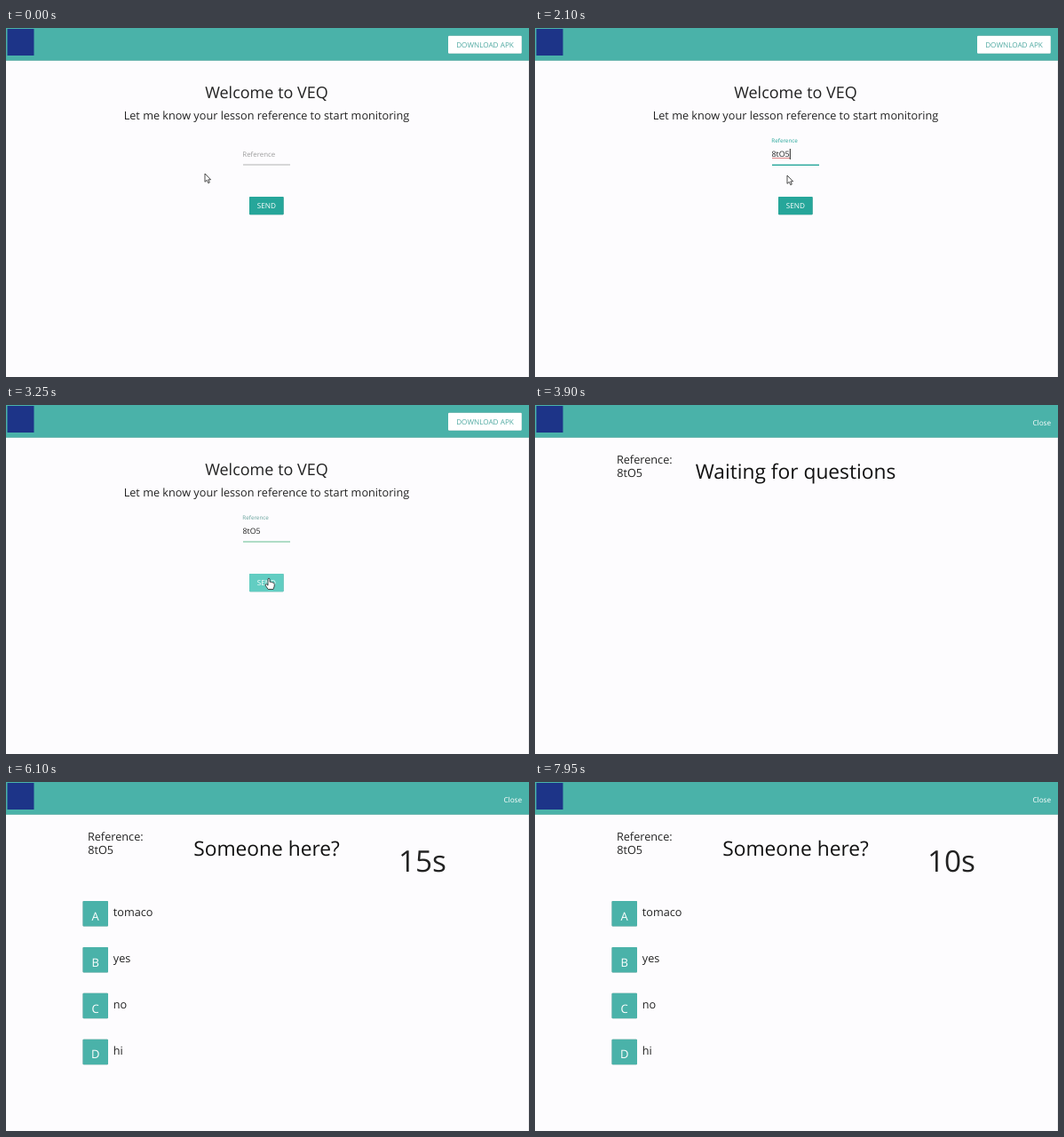
Recreate the animation shown at these times as an HTML page. Size 589 by 393 pixels, loop 8 s.

```html
<!DOCTYPE html>
<html lang="en">
<head>
<meta charset="utf-8">
<style>
  html, body { margin: 0; width: 100%; height: 100%; overflow: hidden; background: #fdfcfe; }
  svg { display: block; width: 589px; height: 393px; font-family: "Open Sans", "Noto Sans", sans-serif; fill: #222; text-rendering: geometricPrecision; }
  .teal { fill: #4ab2a9; }
  .white { fill: #fff; }
  .mid { text-anchor: middle; }
  .raised { filter: drop-shadow(0 .8px .5px rgba(0, 0, 0, .32)); }
  .caps { font-size: 8.2px; font-weight: 500; }
  .body { font-size: 12.7px; }
  .title { font-size: 22.75px; fill: #111; }
  .pointer { stroke: #222; stroke-width: .8; stroke-linejoin: round; fill: #fff; }
</style>
</head>
<body>
<svg viewBox="0 0 589 393">
  <rect x="588" y="37" width="1" height="356" fill="#ecebed"/>
  <rect class="teal raised" width="589" height="36.7"/>
  <rect x="1.5" y="1" width="30" height="30" fill="#1d3488"/>

  <g id="login">
    <rect class="white raised" x="498" y="8.8" width="82.8" height="20" rx="1"/>
    <text class="caps mid" x="539.5" y="21.5" fill="#4fa9a1">DOWNLOAD APK</text>
    <text class="mid" x="293.5" y="78.5" font-size="18">Welcome to VEQ</text>
    <text class="body mid" x="293.5" y="103">Let me know your lesson reference to start monitoring</text>
    <text id="label" font-size="7.9">Reference</text>
    <text id="typed" x="266.5" y="145.4" font-size="8.9"></text>
    <path id="squiggle" fill="none" stroke="#c33" stroke-width=".6"/>
    <rect id="caret" y="136" width="1" height="12"/>
    <rect id="underline" x="267" width="53"/>
    <rect id="send" class="raised" x="274" y="190" width="38.7" height="20.3" rx="1"/>
    <text class="caps white mid" x="293.3" y="203.2">SEND</text>
    <rect id="ripple" class="white" x="274" y="190" width="38.7" height="20.3" rx="1"/>
    <g id="cursor">
      <path id="arrow" class="pointer" d="M0 0V9.3L2.2 7.3L3.8 10.7L5.3 10L3.8 6.8H6.6Z"/>
      <path id="beam" d="M-2-4.5H-.5L0-4L.5-4.5H2M0-4V4M-2 4.5H-.5L0 4L.5 4.5H2" fill="none" stroke="#222" stroke-width=".9"/>
      <path id="hand" class="pointer" d="M-1 .8Q0-.8 1 .8V4.3Q2.3 3.6 3 4.7Q4.2 4.2 4.7 5.2Q6.2 5 6.2 6.5V9L5 12.5H-.8L-3.8 8.2Q-4.2 6.4-2.6 6.8L-1 8.2Z"/>
    </g>
  </g>

  <g id="lesson">
    <text class="white" x="560.4" y="22.8" font-size="8.2">Close</text>
    <text class="body" x="91.9" y="66">Reference:</text>
    <text class="body" x="92.2" y="81">8tO5</text>
    <text id="waiting" class="title mid" x="293.5" y="83">Waiting for questions</text>
    <g id="question">
      <text class="title mid" x="293.5" y="83">Someone here?</text>
      <text id="counter" x="442" y="100.8" font-size="33.3"></text>
      <g id="answers"></g>
    </g>
  </g>
</svg>
<script>
const LOOP = 8000, FOCUS = 1080, TYPE = 1400, KEY = 130, CLICK = 3170;
const LESSON = 3550, QUESTION = 5925, TICK = 375;
const CODE = "8tO5";
// Pointer stops: time, x, y
const PATH = [[0, 224, 164], [350, 224, 164], [900, 278, 149], [1500, 278, 149],
              [1950, 284, 166], [2450, 284, 166], [2900, 296, 195], [LOOP, 296, 195]];

const el = id => document.getElementById(id);
const show = (id, on) => el(id).style.display = on ? "" : "none";
const set = (id, attrs) => { for (const k in attrs) el(id).setAttribute(k, attrs[k]); };
const ramp = (t, from, to) => Math.min(1, Math.max(0, (t - from) / (to - from)));
const smooth = p => p * p * (3 - 2 * p);
const mix = (a, b, p) => a + (b - a) * p;
const blend = (a, b, p) => `rgb(${a.map((v, i) => Math.round(mix(v, b[i], p)))})`;

const GREY = [158, 158, 158], TEAL = [38, 166, 154], LIGHT = [43, 187, 173], GREEN = [76, 175, 80];

el("answers").innerHTML = ["tomaco", "yes", "no", "hi"].map((word, i) => `
  <g transform="translate(0 ${i * 51.9})">
    <rect class="teal raised" x="86.5" y="134" width="28.5" height="28.5" rx="1"/>
    <text class="white mid" x="100.7" y="155.8" font-size="13">${"ABCD"[i]}</text>
    <text class="body" x="120.8" y="151.2">${word}</text>
  </g>`).join("");

function pointerAt(t) {
  const i = PATH.findIndex(stop => stop[0] > t);
  const [t0, x0, y0] = PATH[i - 1], [t1, x1, y1] = PATH[i];
  const p = smooth(ramp(t, t0, t1));
  return [mix(x0, x1, p), mix(y0, y1, p)];
}

function drawLogin(t) {
  const focused = t >= FOCUS && t < CLICK;
  const lift = ramp(t, FOCUS, FOCUS + 85);
  const blur = ramp(t, CLICK, CLICK + 150);
  const gain = ramp(t, FOCUS, FOCUS + 60);
  set("label", {
    transform: `translate(266.3 ${mix(145.3, 129.2, lift)}) scale(${mix(1, .8, lift)})`,
    fill: t < CLICK ? blend(GREY, TEAL, gain) : blend(TEAL, GREY, blur)
  });

  const count = Math.min(CODE.length, Math.max(0, Math.floor((t - TYPE) / KEY)));
  el("typed").textContent = CODE.slice(0, count);
  const width = count ? el("typed").getComputedTextLength() : 0;
  show("squiggle", focused && count);
  set("squiggle", { d: "M267 147" + "l1-1l1 1".repeat(Math.round(width / 2)) });
  const typing = t >= TYPE && t < TYPE + KEY * 6;
  show("caret", focused && (typing || (t - FOCUS) % 380 < 190));
  set("caret", { x: 266.6 + width });
  set("underline", {
    y: 153.6,
    height: focused ? mix(.8, 1.4, ramp(t, FOCUS, FOCUS + 140)) : .8,
    fill: t < CLICK ? blend(GREY, TEAL, gain) : blend(TEAL, GREEN, blur)
  });

  const [x, y] = pointerAt(t);
  const overSend = x > 274 && x < 313 && y > 190 && y < 211;
  const overField = x > 267 && x < 320 && y > 132 && y < 154;
  set("cursor", { transform: `translate(${x} ${y})` });
  show("arrow", !overSend && !overField);
  show("beam", overField);
  show("hand", overSend);
  set("send", { fill: blend(TEAL, LIGHT, overSend ? 1 : 0) });
  set("ripple", { opacity: .26 * ramp(t, CLICK, CLICK + 60) * (1 - ramp(t, CLICK + 130, CLICK + 330)) });
}

function frame(now) {
  const t = now % LOOP;
  const inLesson = t >= LESSON, asked = t >= QUESTION;
  show("login", !inLesson);
  show("lesson", inLesson);
  show("waiting", !asked);
  show("question", asked);
  if (!inLesson) drawLogin(t);
  if (asked) el("counter").textContent = 15 - Math.floor((t - QUESTION) / TICK) + "s";
  requestAnimationFrame(frame);
}
requestAnimationFrame(frame);
</script>
</body>
</html>
```
